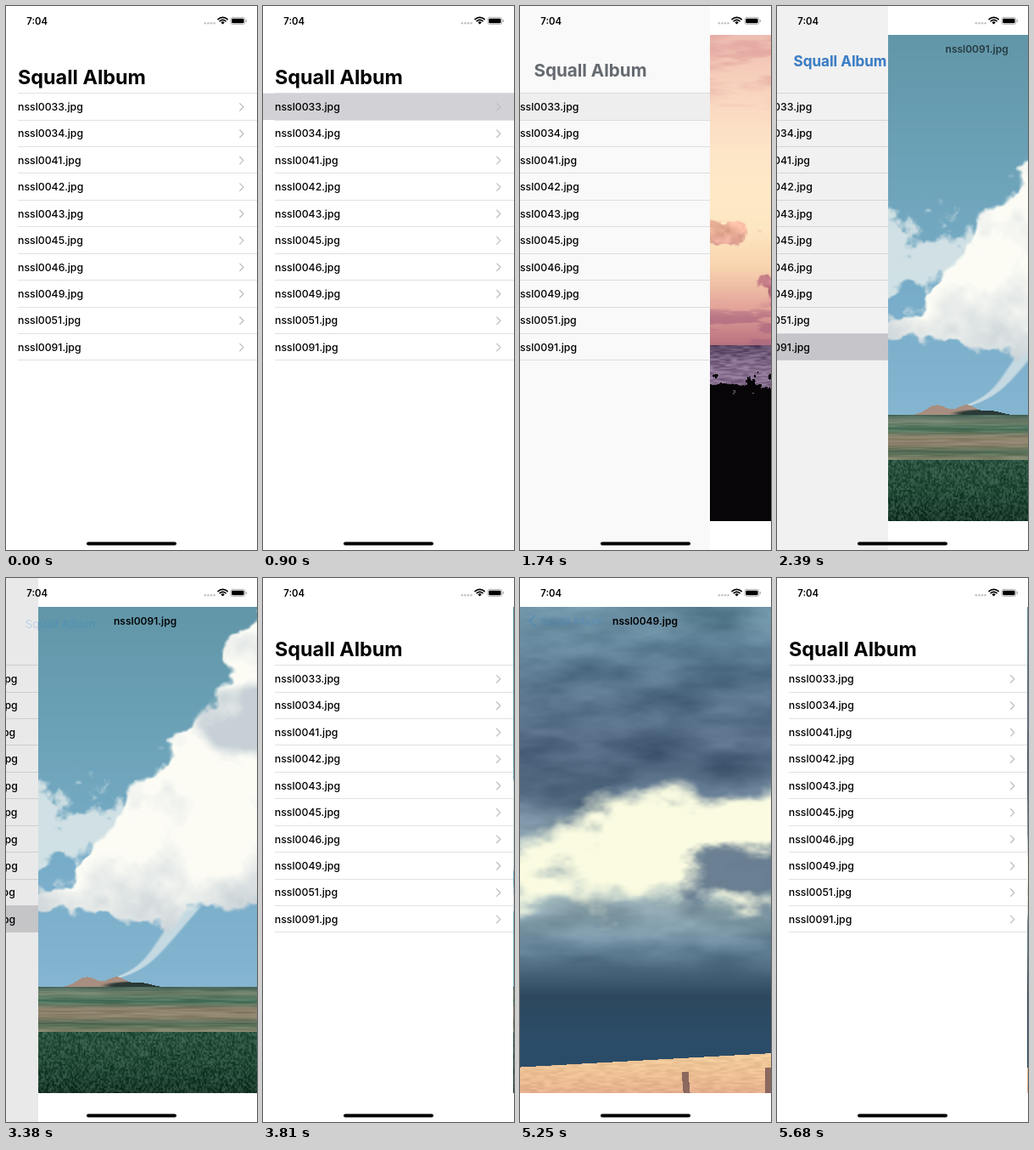
Write an HTML page with a canvas that moves like this. It is 296 px wide and 640 px high and loops after 5.76 s.

```html
<!DOCTYPE html>
<html lang="en">
<head>
<meta charset="utf-8">
<title>Squall Album</title>
<style>
html, body { margin: 0; width: 100%; height: 100%; overflow: hidden; background: #fff; }
canvas { display: block; width: 296px; height: 640px; }
</style>
</head>
<body>
<canvas id="stage"></canvas>
<script>
const W = 296, H = 640, LOOP = 5760;
const PHOTO_TOP = 34, PHOTO_BOTTOM = 606;
const ROW_TOP = 102.7, ROW_H = 31.42;
const APP = 'Squall Album';
const FILES = ['0033', '0034', '0041', '0042', '0043', '0045', '0046', '0049', '0051', '0091']
  .map(n => `nssl${n}.jpg`);

const canvas = document.getElementById('stage');
const dpr = window.devicePixelRatio || 1;
canvas.width = W * dpr;
canvas.height = H * dpr;
const ctx = canvas.getContext('2d');

// ---------- noise and colour helpers ----------

const clamp = v => Math.min(1, Math.max(0, v));
const smooth = (from, to, v) => {
  const t = clamp((v - from) / (to - from));
  return t * t * (3 - 2 * t);
};

const GRID = 128;
let seed = 4711;
const lattice = Float32Array.from({ length: GRID * GRID }, () => {
  seed = (seed * 16807) % 2147483647;
  return seed / 2147483647 - 0.5;
});
const latticeAt = (x, y) => lattice[(x & (GRID - 1)) * GRID + (y & (GRID - 1))];

function noise(x, y) {
  const ix = Math.floor(x), iy = Math.floor(y);
  const u = smooth(0, 1, x - ix), v = smooth(0, 1, y - iy);
  const a = latticeAt(ix, iy), b = latticeAt(ix + 1, iy);
  const c = latticeAt(ix, iy + 1), d = latticeAt(ix + 1, iy + 1);
  return (a + (b - a) * u) * (1 - v) + (c + (d - c) * u) * v;
}

function fbm(x, y) {
  let sum = 0;
  for (let k = 1; k <= 8; k *= 2) sum += noise(x * k, y * k) / k;
  return sum;
}

// 1 at the centre of an ellipse, 0 on its rim, negative outside.
const blob = (x, y, cx, cy, rx, ry) => 1 - Math.hypot((x - cx) / rx, (y - cy) / ry);
const bump = (x, centre, width) => Math.exp(-(((x - centre) / width) ** 2));

const rgb = hex => [1, 3, 5].map(i => parseInt(hex.slice(i, i + 2), 16));
const mix = (a, b, t) => a.map((v, i) => v + (b[i] - v) * t);
const lighten = (color, amount) => color.map(v => v + amount);

function ramp(y0, y1, ...hexes) {
  const colors = hexes.map(rgb);
  return y => {
    const p = clamp((y - y0) / (y1 - y0)) * (colors.length - 1);
    const i = Math.min(colors.length - 2, Math.floor(p));
    return mix(colors[i], colors[i + 1], p - i);
  };
}

function makePhoto(shade) {
  const photo = document.createElement('canvas');
  photo.width = W;
  photo.height = PHOTO_BOTTOM - PHOTO_TOP;
  const g = photo.getContext('2d');
  const image = g.createImageData(photo.width, photo.height);
  for (let y = 0, i = 0; y < photo.height; y++) {
    for (let x = 0; x < W; x++, i += 4) {
      image.data.set(shade(x, y + PHOTO_TOP), i);
      image.data[i + 3] = 255;
    }
  }
  g.putImageData(image, 0, 0);
  return photo;
}

// ---------- photos ----------

function paintSunset() {
  const sky = ramp(34, 398, '#eebdb2', '#f6cebb', '#fbdbc3', '#fde5c7', '#fee9c7', '#fde7c2', '#f8d3ae', '#e4a69b', '#b9727f');
  const sea = ramp(398, 455, '#5a4664', '#7c6585', '#8d7496', '#6f5a75');
  const cumulus = ramp(262, 355, '#f0b59c', '#d58c92', '#b3697e');
  const streak = rgb('#dd9a97'), storm = rgb('#5f5371'), bank = rgb('#ad6a80'), shrubs = rgb('#070507');
  return makePhoto((x, y) => {
    const crest = 443 + 9 * noise(x / 35, 3) + 26 * fbm(x / 7, y / 7);
    if (y > crest) return shrubs;
    if (y > 398) return lighten(sea(y), 55 * noise(x / 7, y / 1.4));
    let c = sky(y);
    c = mix(c, streak, 0.6 * smooth(0, 0.4, fbm(x / 80, y / 18)) * smooth(150, 60, y));
    c = mix(c, storm, 0.95 * smooth(-0.1, 0.55, blob(x, y, 268, 72, 85, 46) + 0.8 * fbm(x / 45, y / 26)));
    c = mix(c, bank, 0.75 * smooth(342, 370, y) * smooth(-0.15, 0.2, fbm(x / 35, y / 9)));
    const heap = Math.max(blob(x, y, 91, 333, 34, 22), blob(x, y, 156, 328, 44, 29),
      blob(x, y, 292, 337, 26, 22), blob(x, y, 16, 268, 38, 16));
    return mix(c, lighten(cumulus(y), 45 * fbm(x / 14, y / 12)), 0.95 * smooth(0, 0.18, heap + 0.6 * fbm(x / 16, y / 16)));
  });
}

function paintTornado() {
  const sky = ramp(34, 480, '#6196a8', '#6ca2b7', '#77acc8', '#85b5d0');
  const fields = ramp(480, 533, '#47665a', '#71826b', '#45705a', '#8a8069', '#8f846d', '#526c55', '#83866c');
  const grass = ramp(533, 606, '#2b5440', '#244b38', '#19382a');
  const white = rgb('#fcfcf5'), grey = rgb('#c6d0d6'), wisp = rgb('#e0eaea');
  const vortex = rgb('#c4d9e2'), hill = rgb('#a88e80'), shadow = rgb('#293a36');
  return makePhoto((x, y) => {
    if (y > 533) return lighten(grass(y), 50 * noise(x / 1.6, y / 2.2));
    if (y > 480) return lighten(fields(y), 30 * noise(x / 30, y / 1.5));
    const hillTop = 481 - 12 * bump(x, 57, 17) - 12 * bump(x, 92, 15) - 5 * bump(x, 122, 16);
    if (y > hillTop && hillTop < 480) return mix(hill, shadow, smooth(0, 0.4, blob(x, y, 118, 479, 48, 6)));

    let c = sky(y);
    c = mix(c, wisp, 0.85 * smooth(0, 0.5, blob(x, y, 22, 290, 60, 48) + 1.3 * fbm(x / 24, y / 24)));
    const u = clamp((y - 385) / 87);
    const spine = 180 - 66 * u - 28 * u ** 8;
    c = mix(c, vortex, smooth(15 - 9 * u, 9 - 8 * u, Math.abs(x - spine)) * smooth(380, 390, y) * smooth(475, 468, y));

    const edge = 255 - 0.73 * (y - 34) + 20 * Math.sin(Math.PI * (y - 34) / 321);
    const base = 402 - (x - 110) ** 2 / 600;
    const depth = Math.min((x - edge) * 0.8, base - y);
    const lumps = fbm(x / 38, y / 38);
    const shade = 0.55 * smooth(75, 5, base - y) + smooth(0, 0.4, blob(x, y, 240, 165, 70, 48)) + 0.7 * lumps - 0.05;
    return mix(c, mix(white, grey, clamp(shade)), smooth(-3, 6, depth + 34 * lumps));
  });
}

function paintSquall() {
  const sky = ramp(34, 606, '#668b9e', '#5c7d94', '#566f89', '#536a84', '#60788e', '#8ea6b0',
    '#98afb5', '#617f94', '#2d485e', '#2b4c68', '#2c4d67');
  const field = ramp(560, 606, '#f0cc9c', '#edbf93', '#e6b08e');
  const glow = rgb('#fafbe0'), dark = rgb('#5b728a'), post = rgb('#8c695f');
  return makePhoto((x, y) => {
    const leftPost = Math.abs(x - 195 - (y - 592) / 12) < 4 && y > 580;
    if (leftPost || (x > 288 && y > 575)) return post;
    if (y > 575 - x / 18) return lighten(field(y), 22 * noise(x / 8, y / 2));
    let c = lighten(sky(y), 38 * fbm(x / 80, y / 28) * smooth(480, 430, y));
    const top = 242 + 78 * Math.exp(-x / 75);
    const depth = Math.min(y - top, (378 - y) * 0.6);
    c = mix(c, glow, smooth(-10, 24, depth + 32 * fbm(x / 45, y / 28)));
    return mix(c, dark, 0.9 * smooth(0, 0.5, blob(x, y, 285, 350, 105, 52) + 0.6 * fbm(x / 40, y / 25)));
  });
}

// ---------- timeline ----------

// Times of the first and last visible step of each slide.
const VISITS = [
  { row: 0, photo: paintSunset(), push: [900, 1330], pop: [1510, 2070] },
  { row: 9, photo: paintTornado(), push: [2270, 2790], pop: [3270, 3810] },
  { row: 7, photo: paintSquall(), push: [4060, 4520], pop: [5150, 5680] }
];
const PUSH_DELAY = 17.5, POP_DELAY = 74, PUSH_STEP = 100, POP_STEPS = 5;

// Pushes step back from their end in fixed strides, pops divide their span evenly.
function pushStep(t, [start, end]) {
  const step = end - PUSH_STEP * Math.ceil(Math.max(0, end - t) / PUSH_STEP);
  return step < start + PUSH_STEP ? start : step;
}
function popStep(t, [start, end]) {
  const stride = (end - start) / POP_STEPS;
  return start + stride * Math.min(POP_STEPS, Math.floor((t - start) / stride));
}

// Share of the way still to go for a critically damped spring.
function springRest(ms) {
  const a = Math.max(0, ms) * Math.sqrt(1000 / 3) / 1000;
  return (1 + a) * Math.exp(-a);
}

// "away" is 1 while the photo is off stage and 0 when it is fully shown.
function stateAt(t) {
  const visit = VISITS.filter(v => v.push[0] <= t).pop();
  if (!visit) return { away: 1 };
  const { push, pop } = visit;
  const popping = t >= pop[0];
  const away = popping
    ? 1 - springRest(popStep(t, pop) - pop[0] - POP_DELAY)
    : springRest(pushStep(t, push) - push[0] - PUSH_DELAY);
  return { visit, popping, away };
}

// ---------- screen ----------

function text(str, x, y, size, weight, color = '#000', alpha = 1, align = 'left') {
  ctx.globalAlpha = clamp(alpha);
  ctx.font = `${weight} ${size}px Inter, sans-serif`;
  ctx.textAlign = align;
  ctx.fillStyle = color;
  ctx.fillText(str, x, y);
  ctx.globalAlpha = 1;
}

function chevron(x, y, dx, dy, color, width, alpha = 1) {
  ctx.globalAlpha = clamp(alpha);
  ctx.strokeStyle = color;
  ctx.lineWidth = width;
  ctx.beginPath();
  ctx.moveTo(x, y - dy);
  ctx.lineTo(x + dx, y);
  ctx.lineTo(x, y + dy);
  ctx.stroke();
  ctx.globalAlpha = 1;
}

function pill(x, y, w, h, r) {
  ctx.beginPath();
  ctx.roundRect(x, y, w, h, r);
}

function drawList({ visit, popping, away }) {
  const shown = 1 - away;
  ctx.save();
  ctx.translate(-0.3 * W * shown, 0);
  if (visit) {
    ctx.globalAlpha = popping ? shown : 1;
    ctx.fillStyle = '#d1d1d6';
    ctx.fillRect(0, ROW_TOP + visit.row * ROW_H, W, ROW_H);
    ctx.globalAlpha = 1;
  }
  ctx.fillStyle = '#dadadc';
  for (let i = 0; i <= FILES.length; i++) ctx.fillRect(14, Math.round(ROW_TOP + i * ROW_H - 0.5), W, 0.8);
  FILES.forEach((file, i) => {
    const y = ROW_TOP + (i + 0.5) * ROW_H;
    text(file, 14, y + 4.6, 12.3, 500);
    chevron(275.8, y + 0.4, 4.2, 4.2, '#bfbfc3', 1.3);
  });
  ctx.restore();
  ctx.fillStyle = `rgba(0,0,0,${0.1 * shown})`;
  ctx.fillRect(0, 0, W, H);
}

function drawDetail({ visit, away }) {
  const x = Math.round(W * away);
  ctx.fillStyle = '#fff';
  ctx.fillRect(x, 0, W, H);
  ctx.drawImage(visit.photo, x, PHOTO_TOP);
}

// The large title shrinks into the back button and grows out of it again.
function drawNavBar({ visit, popping, away }) {
  const x = 24 - 10 * away, y = 54.5 + 37.5 * away, size = 12 + 11.4 * away;
  const press = popping ? 0.18 : 1;
  text(APP, x, y, size, 700, '#000', popping ? away * away : away);
  if (!visit) return;
  text(APP, x, y, size, away > 0.2 ? 700 : 400, '#007aff', (1 - away) * press);
  chevron(17.5, 50.3, -6.5, 6.2, '#007aff', 1.8, (1 - 8 * away) * press);
  text(FILES[visit.row], 147.5 + away * (100 + 225 * away), 54.5, 12, 600, '#000', 1.1 * (1 - away), 'center');
}

function drawStatus() {
  text('7:04', 24.3, 22, 11.3, 600);
  ctx.fillStyle = '#c4c4c6';
  for (let i = 0; i < 4; i++) {
    ctx.beginPath();
    ctx.arc(234.8 + i * 3.6, 20.2, 1.3, 0, 7);
    ctx.fill();
  }
  ctx.strokeStyle = ctx.fillStyle = '#000';
  ctx.lineWidth = 1.7;
  for (const r of [4.9, 7.8]) {
    ctx.beginPath();
    ctx.arc(255.6, 21.2, r, -Math.PI * 0.75, -Math.PI * 0.25);
    ctx.stroke();
  }
  ctx.beginPath();
  ctx.moveTo(255.6, 21.6);
  ctx.arc(255.6, 21.6, 3.1, -Math.PI * 0.75, -Math.PI * 0.25);
  ctx.fill();
  ctx.strokeStyle = '#a5a5a7';
  ctx.lineWidth = 0.8;
  pill(264.9, 13.4, 17, 8.2, 2.4);
  ctx.stroke();
  pill(266.2, 14.7, 14.4, 5.6, 1.3);
  ctx.fill();
  ctx.fillStyle = '#a5a5a7';
  ctx.fillRect(282.8, 16, 1, 3);
  ctx.fillStyle = '#000';
  pill(95, 630.5, 106, 4, 2);
  ctx.fill();
}

function frame() {
  const state = stateAt(performance.now() % LOOP);
  ctx.setTransform(dpr, 0, 0, dpr, 0, 0);
  ctx.lineCap = ctx.lineJoin = 'round';
  ctx.fillStyle = '#fff';
  ctx.fillRect(0, 0, W, H);
  drawList(state);
  if (state.visit) drawDetail(state);
  drawNavBar(state);
  drawStatus();
  requestAnimationFrame(frame);
}
frame();
</script>
</body>
</html>
```
